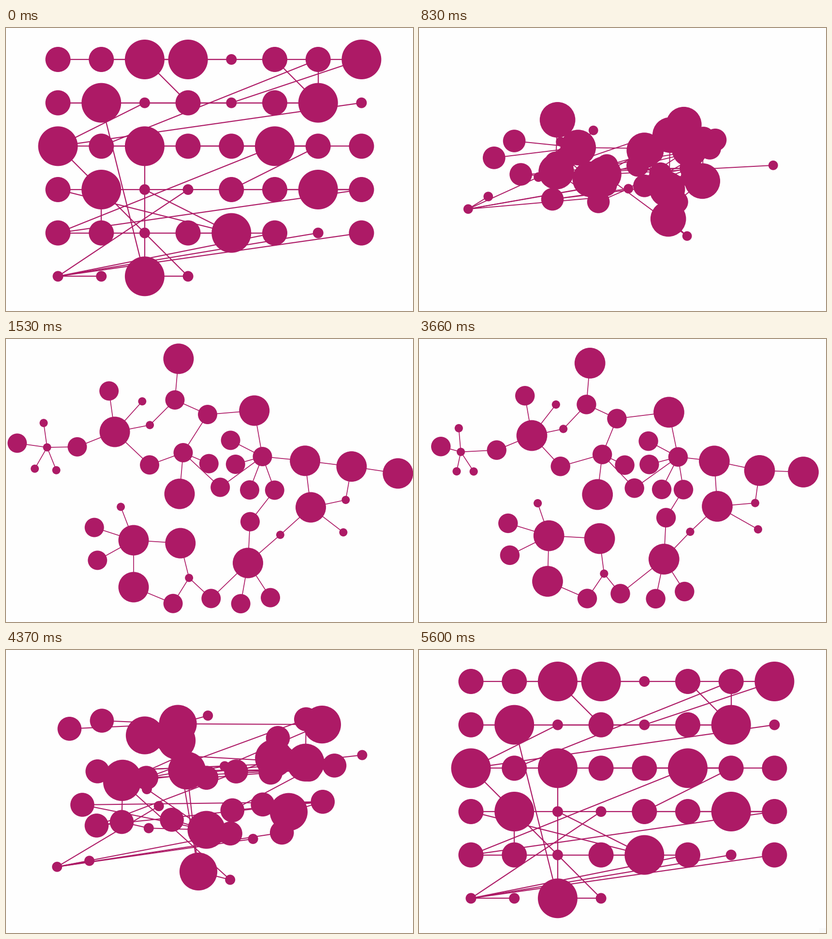
These frames come from a looping animation (842x585 px, 5900 ms). A matplotlib script:

```python
import numpy as np
import matplotlib.pyplot as plt
from matplotlib.animation import FuncAnimation
from matplotlib.collections import EllipseCollection, LineCollection
from matplotlib.patches import Rectangle

W, H, DPI = 842, 585, 64
LOOP, TICK = 5900, 20
COLOR, PAPER = "#ad1a66", "#fefefe"

# Node sizes in reading order of the grid, eight to a row
SIZES = "MMLLSMML" "MLSMSMLS" "LMLMMLMM" "MLSSMMLM" "MMSMLMSM" "SSLS"
RADIUS = np.array([{"S": 11, "M": 26, "L": 41}[s] for s in SIZES])
COUNT = len(SIZES)

# The network view is zoomed out and panned
ZOOM = 0.768
PAN = np.array([-53, -9])

# Free space between linked circles
SNUG, EVEN, LOOSE, WIDE = 18, 34, 45, 65

# The main hubs are fixed; other nodes hang on a hub at a heading in degrees
HUBS = {3: (264, 416), 14: (500.5, 463), 16: (630.5, 348), 22: (530.5, 243),
        31: (366.5, 235), 36: (225, 192), 40: (85, 224)}
ARMS = [
    (3, EVEN, {7: 3.6, 2: 90, 0: 151, 1: 198, 4: 249}),
    (7, EVEN, {12: 76}),
    (12, EVEN, {8: 43, 11: 122}),
    (14, EVEN, {5: 57, 13: 100, 6: 273}),
    (16, EVEN, {18: 263, 43: 348}),
    (16, LOOSE, {15: 37.5, 10: 138}),
    (18, EVEN, {42: 7}),
    (42, EVEN, {9: 8.5}),
    (22, EVEN, {17: 70, 19: 111, 23: 207}),
    (22, LOOSE, {21: 260}),
    (22, SNUG, {20: 164}),
    (31, EVEN, {30: 95, 24: 160}),
    (31, SNUG, {29: 23}),
    (31, WIDE, {28: 43}),
    (36, EVEN, {35: 262, 34: 349}),
    (36, LOOSE, {26: 312}),
    (34, LOOSE, {33: 315}),
    (33, EVEN, {32: 24, 25: 275}),
    (40, EVEN, {27: 68, 38: 120, 39: 188, 41: 262, 37: 359}),
]
# Links that close the loops between arms
LOOPS = [(36, 37), (36, 24), (31, 32), (21, 32), (22, 28), (22, 18),
         (17, 6), (10, 14), (8, 14), (2, 11), (42, 43)]


def place_network():
    spots = np.zeros((COUNT, 2))
    for hub, spot in HUBS.items():
        spots[hub] = spot
    for hub, gap, ends in ARMS:
        for node, heading in ends.items():
            reach = ZOOM * (RADIUS[hub] + RADIUS[node]) + gap
            a = np.radians(heading)
            spots[node] = spots[hub] + reach * np.array([np.cos(a), np.sin(a)])
    return spots


index = np.arange(COUNT)
GRID = np.column_stack([107.5 + 89.7 * (index % 8), 65 + 89.66 * (index // 8)])
NET = (place_network() - PAN) / ZOOM
EDGES = np.array([(hub, node) for hub, _, ends in ARMS for node in ends] + LOOPS)


def ease_out(x):
    """CSS ease-out: cubic-bezier(0, 0, 0.58, 1)."""
    u = np.linspace(0, 1, 400)
    return np.interp(x, 1.74 * u**2 - 0.74 * u**3, 3 * u**2 - 2 * u**3)


def hold(t, start, step):
    return start + (t - start) // step * step


def mix(t):
    """Share of the network layout at time t: 0 is grid, 1 is network."""
    if t < 600:
        return 0.0
    if t < 1530:
        return float(ease_out((hold(t, 600, 76.5) - 534) / 1000))
    if t < 3660:
        return 1.0
    return max(0.0, 1 - (hold(t, 3660, 88.7) - 3624) / 930)


fig = plt.figure(figsize=(W / DPI, H / DPI), dpi=DPI, facecolor=PAPER)
ax = fig.add_axes([0, 0, 1, 1])
ax.axis("off")

lines = LineCollection(GRID[EDGES], colors=COLOR, zorder=1)
dots = EllipseCollection(2 * RADIUS, 2 * RADIUS, np.zeros(COUNT),
                         units="xy", offsets=GRID,
                         offset_transform=ax.transData,
                         facecolors=COLOR, edgecolors="none", zorder=2)
ax.add_collection(lines, autolim=False)
ax.add_collection(dots, autolim=False)

corner = Rectangle((828 / W, 0), 14 / W, 10 / H, transform=ax.transAxes,
                   facecolor="#f9f9f9", edgecolor="none", zorder=0)
ax.add_patch(corner)


def draw(i):
    t = i * TICK + TICK // 2
    s = mix(t)
    nodes = (1 - s) * GRID + s * NET
    zoom = 1 - s + s * ZOOM
    px, py = s * PAN
    ax.set_xlim(-px / zoom, (W - px) / zoom)
    ax.set_ylim((H - py) / zoom, -py / zoom)
    dots.set_offsets(nodes)
    lines.set_segments(nodes[EDGES])
    lines.set_linewidth(2.2 * zoom * 72 / DPI)
    corner.set_alpha(float(np.interp(t, [5460, 5600], [0, 1])))
    return lines, dots, corner


anim = FuncAnimation(fig, draw, frames=LOOP // TICK, interval=TICK,
                     init_func=lambda: draw(0), repeat=True, repeat_delay=0)
plt.show()
```
